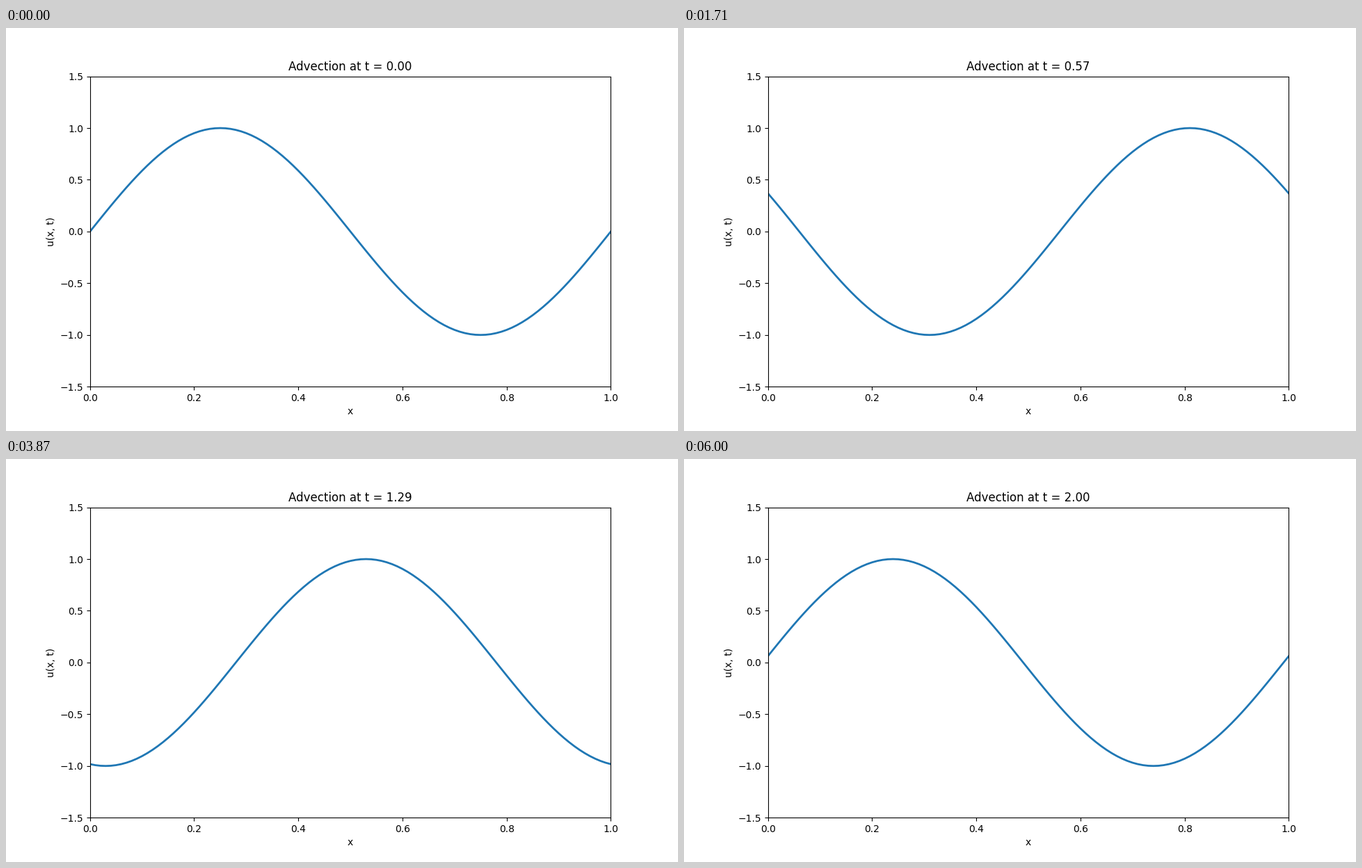
These frames come from a looping animation (966 by 580 pixels, 6030 ms). A matplotlib script:

```python
import numpy as np
import matplotlib.pyplot as plt
from matplotlib.animation import FuncAnimation

WIDTH, HEIGHT, DPI = 966, 580, 100
STEPS, DT, INTERVAL = 201, 0.01, 30

plt.rcParams["font.family"] = "DejaVu Sans"

x = np.linspace(0, 1, 101)


def wave(step):
    # The profile lags the clock by one step.
    return np.sin(2 * np.pi * (x - max(step - 1, 0) * DT))


fig, ax = plt.subplots(figsize=(WIDTH / DPI, HEIGHT / DPI), dpi=DPI)
line, = ax.plot(x, wave(0), lw=2)
ax.set_xlim(0, 1)
ax.set_ylim(-1.5, 1.5)
ax.set_xlabel("x")
ax.set_ylabel("u(x, t)")
title = ax.set_title("Advection at t = 0.00")


def update(step):
    line.set_ydata(wave(step))
    title.set_text(f"Advection at t = {step * DT:.2f}")
    return line, title


anim = FuncAnimation(fig, update, frames=STEPS, interval=INTERVAL,
                     repeat=True, repeat_delay=0, blit=False)
plt.show()
```
